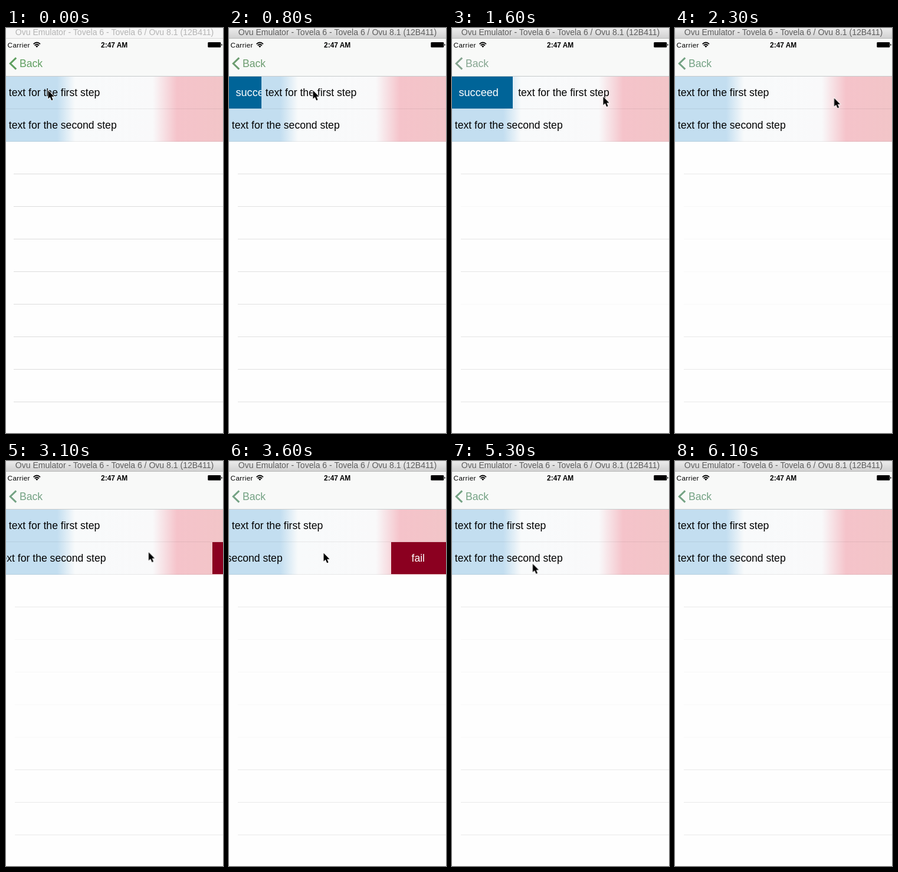
Write an HTML page that moves like this. It is 368 px wide and 684 px high and loops after 7 s.

```html
<!DOCTYPE html>
<html lang="en">
<head>
<meta charset="utf-8">
<title>Swipe actions</title>
<style>
/* One loop is 7 s; motion advances in steps of 100 ms (about 1.43%). */
html, body { margin: 0; width: 100%; height: 100%; overflow: hidden; }
body {
  position: relative; background: #fefefe; color: #000;
  font: 17.6px "Liberation Sans", Arial, sans-serif;
}
body * { animation: 7s step-end infinite; }
svg { position: absolute; left: 0; top: 0; }

.nav {
  position: absolute; top: 17px; width: 100%; height: 65px;
  box-sizing: border-box; background: #f8f9f8; border-bottom: 1px solid #c6cacb;
}
.title {
  position: absolute; width: 100%; height: 17px; line-height: 15px;
  font-size: 14.05px; text-align: center; white-space: nowrap;
  background: linear-gradient(#ebebeb, #d2d2d2); color: #5c5c5c;
  border-bottom: 1px solid #b9b9b9; animation-name: focus;
}
.back { color: #74a284; animation-name: tint; }

.row {
  position: absolute; left: 0; width: 100%; height: 54px;
  line-height: 54px; white-space: nowrap; overflow: hidden;
  background: linear-gradient(90deg, #c3def0 87px, #f8fafb 117px, #f9f9fa 249px, #f5c3ca 290px, #f2c5c8);
  border-bottom: 1px solid rgba(0, 0, 0, .07);
}
.one { top: 82px; }
.two { top: 137px; }
.label { position: absolute; left: 4.8px; top: 0; }
.one .label { animation-name: drag-right; }
.two .label { animation-name: drag-left; }

.action { position: absolute; top: 0; width: 0; height: 54px; overflow: hidden; color: #fff; }
.action span { position: absolute; top: 0; }
.win { left: 0; background: #006498; font-size: 18.1px; animation-name: open-win; }
.win span { left: 11.5px; }
.lose { right: 0; background: #8b0020; animation-name: open-lose; }
.lose span { right: 36px; }

.line {
  position: absolute; left: 15px; right: 0; height: 1px;
  background: #dcdcdc; animation-name: fade;
}
.early { animation-name: fade-early; }
.mid { animation-name: fade-mid; }

.cursor { animation-name: point; overflow: visible; }

@keyframes focus {
  0% { background: #f6f6f6; color: #b4b4b4; border-color: #dadada; }
  1.42%, 100% { background: linear-gradient(#ebebeb, #d2d2d2); color: #5c5c5c; border-color: #b9b9b9; }
}
@keyframes tint {
  0% { color: #5f9f60; }
  5.71% { color: #6c9c70; }
  15.71% { color: #85a590; }
  28.57%, 100% { color: #74a284; }
}
@keyframes fade {
  0% { opacity: 1; left: 13px; }
  5.71% { opacity: .85; left: 15px; }
  15.71% { opacity: .75; left: 15px; }
  25.71%, 100% { opacity: .6; left: 15px; }
}
@keyframes fade-early {
  0% { opacity: 1; left: 13px; }
  5.71% { opacity: .85; left: 15px; }
  15.71%, 100% { opacity: .17; left: 15px; }
}
@keyframes fade-mid {
  0% { opacity: 1; left: 13px; }
  5.71% { opacity: .85; left: 15px; }
  15.71% { opacity: .75; left: 15px; }
  25.71%, 100% { opacity: .17; left: 15px; }
}
@keyframes drag-right {
  0% { transform: none; }
  5.71% { transform: translateX(0); animation-timing-function: steps(4); }
  11.42% { transform: translateX(57px); animation-timing-function: steps(2); }
  14.28% { transform: translateX(87px); animation-timing-function: steps(2); }
  17.14% { transform: translateX(97px); animation-timing-function: steps(5); }
  24.28% { transform: translateX(110px); }
  25.71% { transform: translateX(50px); }
  27.14% { transform: translateX(12px); }
  28.57%, 100% { transform: none; }
}
@keyframes open-win {
  0% { width: 0; }
  5.71% { width: 0; animation-timing-function: steps(4); }
  11.42% { width: 54.5px; animation-timing-function: steps(2); }
  14.28% { width: 84px; animation-timing-function: steps(2); }
  17.14% { width: 93px; animation-timing-function: steps(5); }
  24.28% { width: 106px; }
  25.71% { width: 48px; }
  27.14% { width: 11px; }
  28.57%, 100% { width: 0; }
}
@keyframes drag-left {
  0% { transform: none; }
  42.85% { transform: translateX(0); animation-timing-function: steps(5); }
  50% { transform: translateX(-91px); }
  51.42% { transform: translateX(-97px); animation-timing-function: steps(2); }
  54.28% { transform: translateX(-102px); }
  55.71% { transform: translateX(-52px); }
  57.14% { transform: translateX(-13px); }
  58.57%, 100% { transform: none; }
}
@keyframes open-lose {
  0% { width: 0; }
  42.85% { width: 0; animation-timing-function: steps(5); }
  50% { width: 88px; }
  51.42% { width: 93px; animation-timing-function: steps(2); }
  54.28% { width: 98px; }
  55.71% { width: 50px; }
  57.14% { width: 12px; }
  58.57%, 100% { width: 0; }
}
@keyframes point {
  0% { transform: translate(71px, 105px); }
  4.28% { transform: translate(71px, 105px); animation-timing-function: steps(5); }
  11.42% { transform: translate(142px, 105px); animation-timing-function: steps(4); }
  17.14% { transform: translate(204px, 110px); animation-timing-function: steps(5); }
  24.28% { transform: translate(269px, 117px); animation-timing-function: steps(6); }
  32.85% { transform: translate(269.5px, 118px); animation-timing-function: steps(5); }
  40% { transform: translate(274px, 153px); }
  41.42% { transform: translate(274px, 153px); animation-timing-function: steps(7); }
  51.42% { transform: translate(160px, 155px); animation-timing-function: steps(3); }
  55.71% { transform: translate(131px, 154px); }
  71.42% { transform: translate(131px, 154px); animation-timing-function: steps(5); }
  78.57% { transform: translate(140px, 186px); }
  82.85% { transform: translate(140px, 186px); animation-timing-function: steps(2); }
  85.71% { transform: translate(318px, 165px); visibility: visible; }
  87.14%, 100% { transform: translate(318px, 165px); visibility: hidden; }
}
</style>
</head>
<body>
<div class="nav"></div>
<div class="title">Ovu Emulator - Tovela 6 - Tovela 6 / Ovu 8.1 (12B411)</div>

<svg width="368" height="82" font-family="'Liberation Sans', Arial, sans-serif">
  <text x="2.6" y="32.5" font-size="11.8" letter-spacing=".3">Carrier</text>
  <g fill="none" stroke="#000" stroke-width="1.9">
    <path d="M46.6 27.1Q52.3 21.9 58 27.1"/>
    <path d="M48.7 29.5Q52.3 26.2 55.9 29.5"/>
  </g>
  <path d="M50.2 30.7Q52.3 29 54.4 30.7L52.3 33Z"/>
  <text x="183.7" y="32.5" font-size="11.9" font-weight="bold" text-anchor="middle">2:47 AM</text>
  <rect x="342.3" y="24" width="22" height="8.8" rx="1.4"/>
  <path d="M365.2 26.7q1.4 .4 1.4 1.7t-1.4 1.7z"/>
  <g class="back">
    <path d="M17.2 50.3L7.2 60L17.2 69.7" fill="none" stroke="currentColor" stroke-width="3"/>
    <text x="23" y="66" font-size="17.6" fill="currentColor">Back</text>
  </g>
</svg>

<div class="row one">
  <span class="label">text for the first step</span>
  <div class="action win"><span>succeed</span></div>
</div>
<div class="row two">
  <span class="label">text for the second step</span>
  <div class="action lose"><span>fail</span></div>
</div>

<div class="line" style="top:246px"></div>
<div class="line early" style="top:301px"></div>
<div class="line mid" style="top:356px"></div>
<div class="line mid" style="top:411px"></div>
<div class="line early" style="top:466px"></div>
<div class="line" style="top:521px"></div>
<div class="line" style="top:576px"></div>
<div class="line" style="top:631px"></div>

<svg class="cursor" width="12" height="19">
  <path d="M.5 .5V14.6L3.7 11.6L6.2 17.2L8.6 16.2L6.2 10.8H10.6Z" stroke="#fff" stroke-width="1.6" paint-order="stroke"/>
</svg>
</body>
</html>
```
